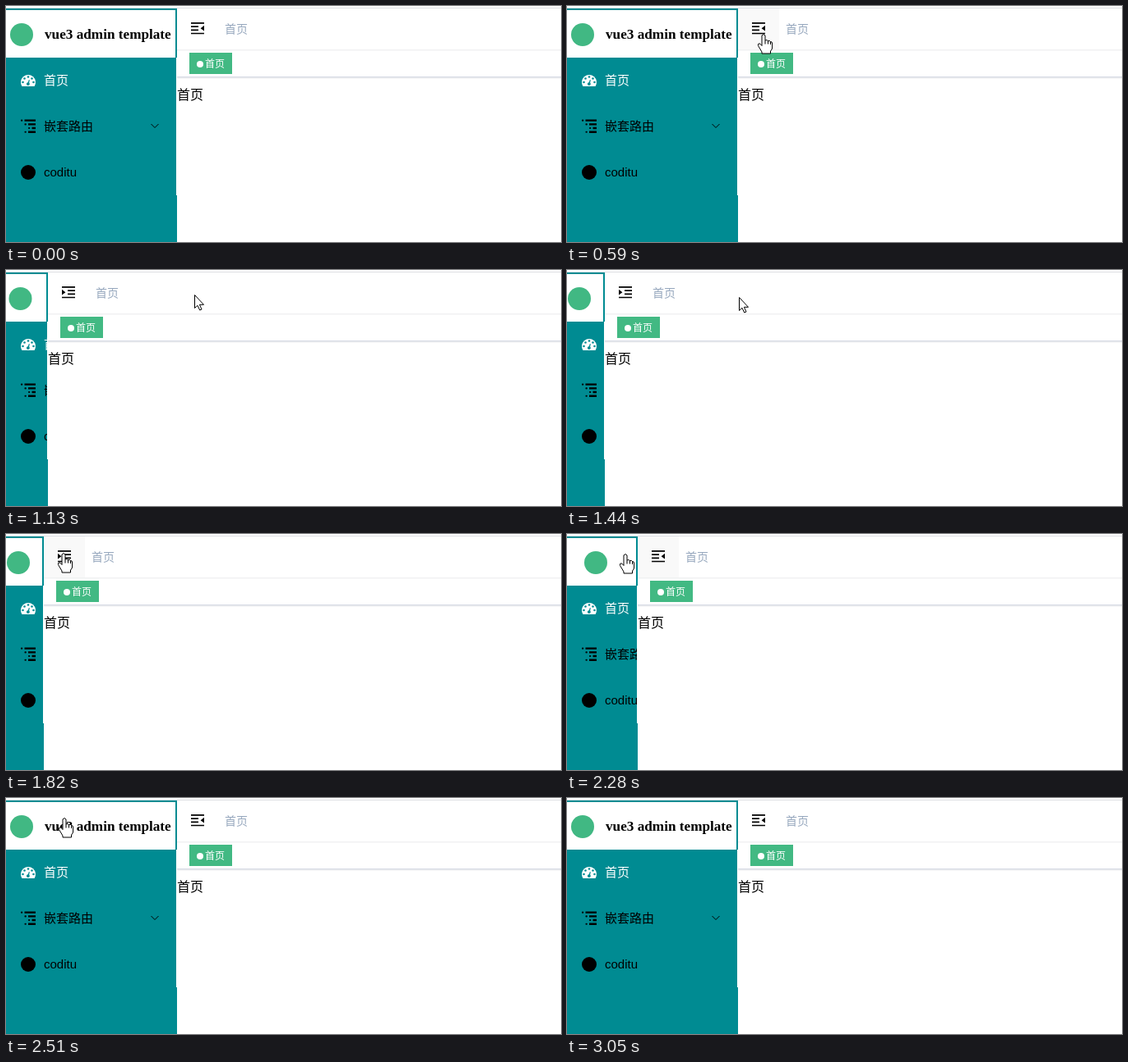
Recreate the animation shown at these times as an HTML page. Size 675 by 288 pixels, loop 3750 ms.

```html
<!DOCTYPE html>
<html lang="zh-CN">
<head>
<meta charset="utf-8">
<title>vue3 admin template</title>
<style>
  html, body { margin: 0; width: 100%; height: 100%; overflow: hidden; background: #fff; }
  svg { display: block; }
  text { font-family: "Liberation Sans", "Noto Sans CJK SC", "Noto Sans CJK", sans-serif; }
  .menu { font-size: 15px; }
  .title { font: bold 17.2px "Liberation Serif", serif; }
  .teal { fill: #008b92; }
</style>
</head>
<body>
<svg width="675" height="288" viewBox="0 0 675 288">
  <rect y="2" width="675" height="1" fill="#dcdee2"/>

  <g id="main">
    <rect id="hover" y="3" width="50" height="50" fill="#f9f9f9"/>
    <rect y="53" width="675" height="1" fill="#f0f1f2"/>
    <rect y="54" width="675" height="1" fill="#f8f8f9"/>
    <g id="fold">
      <path d="M-8 -6.2H8M-8 -1.9H1M-8 2.3H1M-8 6.5H8" stroke="#000" stroke-width="1.7"/>
      <path d="M8 -3.2V3.6L3.6 .2Z"/>
    </g>
    <text x="58" y="33" font-size="14" fill="#97a8be">首页</text>
    <rect x="15" y="57" width="52" height="26" fill="#42b983"/>
    <circle cx="28" cy="71" r="4" fill="#fff"/>
    <text x="34" y="75" font-size="12" fill="#fff">首页</text>
    <rect y="86" width="675" height="1" fill="#d8dce5"/>
    <rect y="87" width="675" height="1" fill="#e6e8ec"/>
    <rect y="88" width="675" height="1" fill="#f6f6f8"/>
    <text y="114" font-size="16">首页</text>
  </g>

  <svg id="side" height="288">
    <rect class="teal" y="3" width="208" height="285"/>
    <rect id="brand" y="5" height="58" fill="#fff"/>
    <circle id="logo" cy="35" r="14" fill="#41b883"/>
    <text id="title" class="title" x="47" y="40">vue3 admin template</text>

    <g transform="translate(18 84) scale(.1406)">
      <path fill="#fff" d="M10 99A64 64 0 1 1 118 99Z"/>
      <g class="teal">
        <circle cx="18" cy="64" r="9"/><circle cx="32" cy="32" r="9"/>
        <circle cx="64" cy="18" r="9"/><circle cx="96" cy="32" r="9"/>
        <circle cx="110" cy="64" r="9"/><circle cx="63" cy="79" r="14"/>
        <path d="M60 72L70 42 77 44 70 76Z"/>
      </g>
    </g>
    <text class="menu" x="46" y="96" fill="#fff">首页</text>

    <g transform="translate(18 138.5) scale(.1406 .128)">
      <path d="M32 0H128V18H32ZM64 37H128V55H64ZM96 73H128V91H96ZM64 110H128V128H64Z"/>
      <circle cx="8" cy="9" r="8.5"/><circle cx="40" cy="46" r="8.5"/>
      <circle cx="72" cy="82" r="8.5"/><circle cx="40" cy="119" r="8.5"/>
    </g>
    <text class="menu" x="46" y="152">嵌套路由</text>
    <path d="M176.5 144L181 148.5 185.5 144" fill="none" stroke="#000"/>

    <circle cx="27" cy="203" r="9"/>
    <text class="menu" x="46" y="208">coditu</text>
    <rect id="edge" y="63" width="1" height="168" fill="#fff"/>
  </svg>

  <g id="cursor" fill="#fff" stroke="#000" stroke-linejoin="round">
    <path id="arrow" d="M.5 .5V16.5L4 13.3 6.7 19 9 18 6.4 12.3H11.5Z"/>
    <g id="hand">
      <path d="M-2 2Q0 -1 2 2V8Q4 6.7 5.5 8.6 7.5 7.7 8.5 9.6 10.6 9 10.6 12V17Q10.6 19 8.5 21V24H-2V22L-6.5 14.5Q-7 11.5 -5 11.8 -3.8 12 -2 14.5Z"/>
      <path d="M2 8V12.5M5.5 8.6V12.5M8.5 9.6V13" fill="none"/>
    </g>
  </g>
</svg>

<script>
const LOOP = 3750, FIRST = 130, STEP = 230 / 3;
const OPEN = 208, CLOSED = 46, SLIDE = 280;
const CLOSE_AT = 908, OPEN_AT = 2227;

// Pointer hot spot: step, x, y
const path = [
  [0, 458, 264], [3, 320, 115], [6, 239, 34], [10, 236, 33], [13, 229, 30],
  [16, 229, 30], [19, 170, 38], [22, 70, 23], [27, 70, 23], [28, 71, 24],
  [31, 71, 24], [34, 132, 21], [35, 235, 60], [37, 575, 238]
];

const $ = id => document.getElementById(id);
const set = (id, name, value) => $(id).setAttribute(name, value);
const show = (id, on) => set(id, 'display', on ? 'inline' : 'none');

// CSS "ease": cubic-bezier(.25, .1, .25, 1)
function ease(x) {
  if (x <= 0) return 0;
  if (x >= 1) return 1;
  let lo = 0, hi = 1, u;
  for (let i = 0; i < 20; i++) {
    u = (lo + hi) / 2;
    if (.75 * u * (1 - u) + u ** 3 < x) lo = u; else hi = u;
  }
  return .3 * u * (1 - u) ** 2 + 3 * (1 - u) * u * u + u ** 3;
}

function sideWidth(time) {
  const closed = ease((time - CLOSE_AT) / SLIDE) - ease((time - OPEN_AT) / SLIDE);
  return Math.round(OPEN - (OPEN - CLOSED) * closed);
}

function pointer(step) {
  const i = path.findIndex(p => p[0] >= step);
  if (i <= 0) return path[0].slice(1);
  const [s0, x0, y0] = path[i - 1], [s1, x1, y1] = path[i];
  const f = (step - s0) / (s1 - s0);
  return [Math.round(x0 + (x1 - x0) * f), Math.round(y0 + (y1 - y0) * f)];
}

function draw(now) {
  const step = Math.floor((now % LOOP - FIRST + 4) / STEP);
  const time = FIRST + step * STEP;
  const width = sideWidth(time);

  set('main', 'transform', `translate(${width})`);
  set('side', 'width', width);
  set('brand', 'width', width - 2);
  set('edge', 'x', width - 1);
  const titled = width > 203;
  show('title', titled);
  set('logo', 'cx', titled ? 19 : width / 2 - 8);
  const closed = time > CLOSE_AT && time < OPEN_AT;
  set('fold', 'transform', `translate(25 27) scale(${closed ? -1 : 1} 1)`);

  const visible = step >= 0 && step <= 37;
  const [x, y] = pointer(step);
  // Hover follows the layout one step late
  const seen = sideWidth(time - STEP);
  const onFold = visible && x >= seen && x < seen + 50 && y < 53;
  const onBrand = x < seen && y < 63;
  show('hover', onFold);
  show('cursor', visible);
  show('hand', onFold || onBrand);
  show('arrow', !onFold && !onBrand);
  set('cursor', 'transform', `translate(${x} ${y})`);
}

const start = performance.now();
(function tick() {
  draw(performance.now() - start);
  requestAnimationFrame(tick);
})();
</script>
</body>
</html>
```
